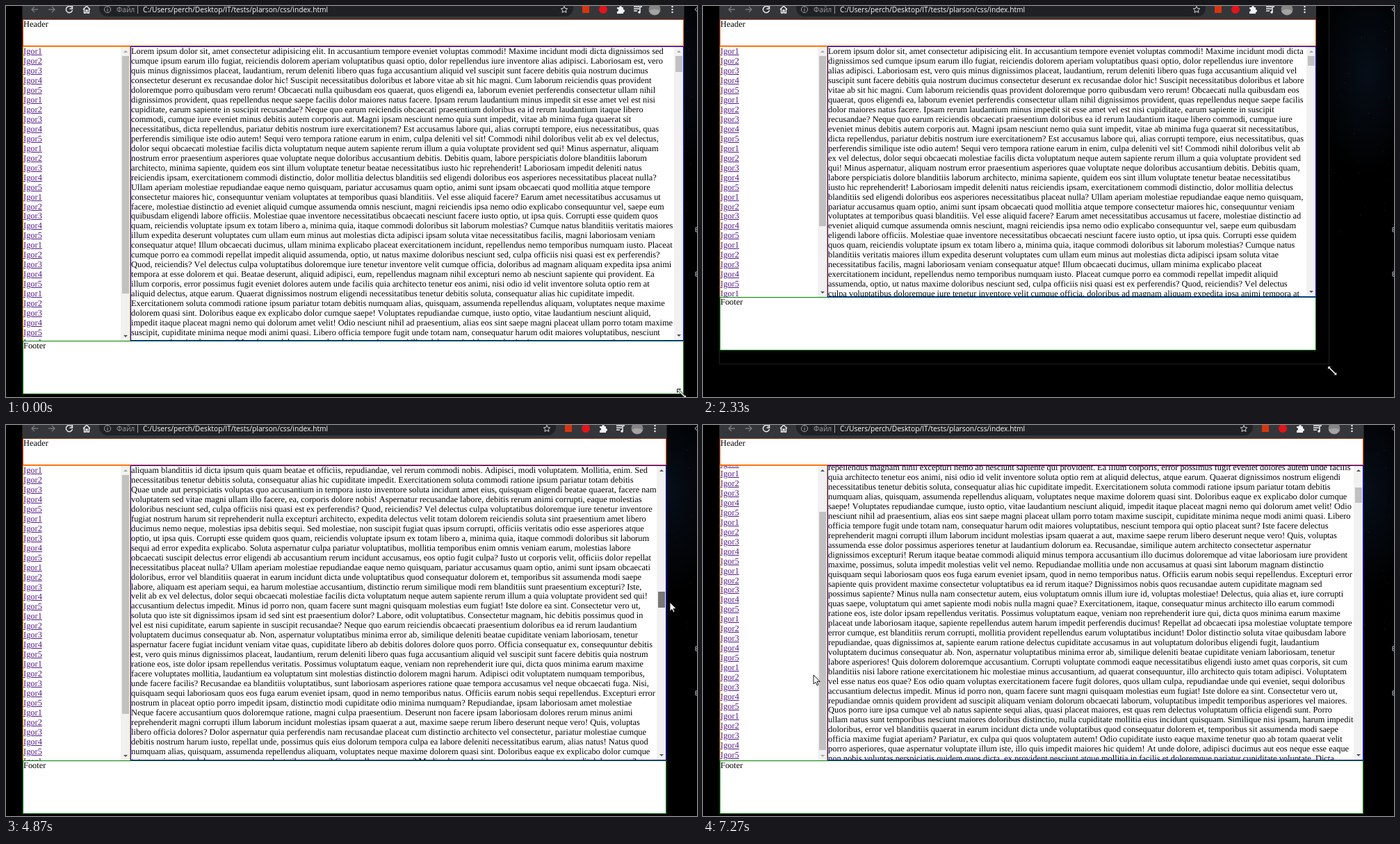
An HTML page that plays this animation: 994x563 px, repeating every 7940 ms.

```html
<!DOCTYPE html>
<html lang="ru">
<head>
<meta charset="utf-8">
<title>Layout resize</title>
<style>
html, body { margin: 0; width: 100%; height: 100%; overflow: hidden; background: #000; }
#stage { position: absolute; width: 994px; height: 563px; overflow: hidden; }
#stage > *, #page > *, .bar, .bar *, #win > * { position: absolute; box-sizing: border-box; }
svg { left: 0; top: 0; overflow: visible; }
#ghost { left: 23px; top: -2px; background: #000; border: 1px solid #1f1f1f; }
#win { left: 24px; top: 0; overflow: hidden; background: #fff; }
#tools { left: -24px; }
#page { font: 12.4px/13.966px "Liberation Serif", "Times New Roman", serif; text-rendering: geometricPrecision; font-kerning: none; font-variant-ligatures: none; }
#page > * { overflow: hidden; background: #fff; }
header { left: 0; right: 0; top: 19px; height: 39px; border: 1px solid orangered; }
aside { left: 0; width: 155px; top: 58px; bottom: 76px; border: 1px solid orange; }
main { left: 155px; right: 0; top: 58px; bottom: 77px; border: 1px solid blue; }
footer { left: 0; right: 0; bottom: 0; height: 77px; border: 1px solid green; }
#text { margin-right: 13px; }
#list span { display: block; color: #551a8b; text-decoration: underline; }
.bar { right: 0; top: 0; bottom: 0; width: 13px; background: #f1f1f1; }
.bar b { left: 2px; width: 10px; }
.bar i { left: 4px; border: 3px solid transparent; }
.bar .up { top: 2px; border-bottom-color: currentColor; }
.bar .down { bottom: 2px; border-top-color: currentColor; }
</style>
</head>
<body>
<div id="stage">
  <svg id="sky" width="994" height="563">
    <radialGradient id="haze"><stop stop-color="#070e18"/><stop offset="1"/></radialGradient>
    <ellipse cx="955" cy="95" rx="75" ry="150" fill="url(#haze)"/>
    <path d="M994 2l-3 3 3 3M994 319h-2v6h2M992 322h2M994 383h-2v6h2M992 386h2" fill="none" stroke="#a9bccb"/>
  </svg>
  <div id="ghost"></div>
  <div id="win">
    <div id="page">
      <header>Header</header>
      <aside><div id="list"></div><div class="bar"><i class="up"></i><b></b><i class="down"></i></div></aside>
      <main><div id="text"></div><div class="bar"><i class="up"></i><b></b><i class="down"></i></div></main>
      <footer>Footer</footer>
    </div>
    <svg id="tools" width="994" height="20" font-family="Open Sans, sans-serif" font-size="10.25">
      <path d="M24-1h980v20.5H24z" fill="#35363a"/>
      <rect id="pill" x="134" y="-10" height="25" rx="12" fill="#202124"/>
      <g fill="none" stroke="#f1f3f4" stroke-width="1.4">
        <path d="M46 5H37M41 1l-4 4 4 4M61 5h9M66 1l4 4-4 4" stroke="#77787b"/>
        <path d="M94.5 2A4.6 4.6 0 1 0 95.5 6M95.5 0v4h-4M111 5l5-5 5 5M112.5 4v6h2.5V6h2v4h2.5V4"/>
        <g stroke="#9aa0a6" stroke-width="1"><circle cx="146" cy="5" r="4.6"/><path d="M146 4v4M146 2v1M189.5 0v11"/></g>
      </g>
      <text x="159" y="9" fill="#9aa0a6">Файл</text>
      <text x="197" y="9" fill="#fff">C:/Users/perch/Desktop/IT/tests/plarson/css/index.html</text>
      <g id="icons" fill="#f1f3f4">
        <path d="M803 .5l1.4 3 3.3.4-2.4 2.2.7 3.3-3-1.7-3 1.7.7-3.3-2.4-2.2 3.3-.4z" fill="none" stroke="#dadce0"/>
        <path d="M829 0h10v10h-10z" fill="#d8350f"/>
        <circle cx="859" cy="5" r="6" fill="#e3141b"/>
        <path d="M879 2h3a2 2 0 1 1 4 0h2v3a2 2 0 1 1 0 4v2h-9V8a2 2 0 0 0 0-4z"/>
        <path d="M903 1h8M903 4h8M903 7h5M912 9V1h3" fill="none" stroke="#f1f3f4" stroke-width="1.5"/>
        <circle cx="911" cy="9" r="1.8"/>
        <circle cx="933" cy="5" r="8.5" fill="#858585"/><path d="M925 7q8-5 16 0a8.5 8.5 0 0 1-16 0" fill="#a5a3a3"/>
        <circle cx="958.5" cy="1" r="1.2"/><circle cx="958.5" cy="5" r="1.2"/><circle cx="958.5" cy="9" r="1.2"/>
      </g>
    </svg>
  </div>
  <svg width="994" height="563" fill="#fff" stroke="#000" stroke-width=".9">
    <path id="sizer" d="M-6.5-6.5h5L-3.2-4.8 4.8 3.2 6.5 1.5v5h-5L3.2 4.8-4.8-3.2-6.5-1.5z"/>
    <path id="arrow" d="M0 0v13l3-2.8 2 4.6 2-.9-2-4.5h4.2z"/>
  </svg>
</div>
<script>
const LOOP = 7940, STEP = 200 / 3, LINE = 13.966;
const $ = s => document.querySelector(s);

const opening = `Lorem ipsum dolor sit, amet consectetur adipisicing elit. In accusantium tempore eveniet voluptas commodi! Maxime incidunt modi dicta dignissimos
sed cumque ipsum earum illo fugiat, reiciendis dolorem aperiam voluptatibus quasi optio, dolor repellendus iure inventore alias adipisci. Laboriosam
est, vero quis minus dignissimos placeat, laudantium, rerum deleniti libero quas fuga accusantium aliquid vel suscipit sunt facere debitis quia nostrum
ducimus consectetur deserunt ex recusandae dolor hic! Suscipit necessitatibus doloribus et labore vitae ab sit hic magni. Cum laborum reiciendis quas
provident doloremque porro quibusdam vero rerum! Obcaecati nulla quibusdam eos quaerat, quos eligendi ea, laborum eveniet perferendis consectetur
ullam nihil dignissimos provident, quas repellendus neque saepe facilis dolor maiores natus facere. Ipsam rerum laudantium minus impedit sit esse amet
vel est nisi cupiditate, earum sapiente in suscipit recusandae? Neque quo earum reiciendis obcaecati praesentium doloribus ea id rerum laudantium
itaque libero commodi, cumque iure eveniet minus debitis autem corporis aut. Magni ipsam nesciunt nemo quia sunt impedit, vitae ab minima fuga
quaerat sit necessitatibus, dicta repellendus, pariatur debitis nostrum iure exercitationem? Est accusamus labore qui, alias corrupti tempore, eius
necessitatibus, quas perferendis similique iste odio autem! Sequi vero tempora ratione earum in enim, culpa deleniti vel sit! Commodi nihil doloribus
velit ab ex vel delectus, dolor sequi obcaecati molestiae facilis dicta voluptatum neque autem sapiente rerum illum a quia voluptate provident sed qui!
Minus aspernatur, aliquam nostrum error praesentium asperiores quae voluptate neque doloribus accusantium debitis. Debitis quam, labore perspiciatis
dolore blanditiis laborum architecto, minima sapiente, quidem eos sint illum voluptate tenetur beatae necessitatibus iusto hic reprehenderit! Laboriosam
impedit deleniti natus reiciendis ipsam, exercitationem commodi distinctio, dolor mollitia delectus blanditiis sed eligendi doloribus eos asperiores
necessitatibus placeat nulla? Ullam aperiam molestiae repudiandae eaque nemo quisquam, pariatur accusamus quam optio, animi sunt ipsam obcaecati
quod mollitia atque tempore consectetur maiores hic, consequuntur veniam voluptates at temporibus quasi blanditiis. Vel esse aliquid facere? Earum
amet necessitatibus accusamus ut facere, molestiae distinctio ad eveniet aliquid cumque assumenda omnis nesciunt, magni reiciendis ipsa nemo odio
explicabo consequuntur vel, saepe eum quibusdam eligendi labore officiis. Molestiae quae inventore necessitatibus obcaecati nesciunt facere iusto
optio, ut ipsa quis. Corrupti esse quidem quos quam, reiciendis voluptate ipsum ex totam libero a, minima quia, itaque commodi doloribus sit laborum
molestias? Cumque natus blanditiis veritatis maiores illum expedita deserunt voluptates cum ullam eum minus aut molestias dicta adipisci ipsam soluta
vitae necessitatibus facilis, magni laboriosam veniam consequatur atque! Illum obcaecati ducimus, ullam minima explicabo placeat exercitationem
incidunt, repellendus nemo temporibus numquam iusto. Placeat cumque porro ea commodi repellat impedit aliquid assumenda, optio, ut natus maxime
doloribus nesciunt sed, culpa officiis nisi quasi est ex perferendis? Quod, reiciendis? Vel delectus culpa voluptatibus doloremque iure tenetur inventore
velit cumque officia, doloribus ad magnam aliquam expedita ipsa animi tempora at esse dolorem et qui. Beatae deserunt, aliquid adipisci, eum,
repellendus magnam nihil excepturi nemo ab nesciunt sapiente qui provident. Ea illum corporis, error possimus fugit eveniet dolores autem unde facilis
quia architecto tenetur eos animi, nisi odio id velit inventore soluta optio rem at aliquid delectus, atque earum. Quaerat dignissimos nostrum eligendi
necessitatibus tenetur debitis soluta, consequatur alias hic cupiditate impedit. Exercitationem soluta commodi ratione ipsum pariatur totam debitis
numquam alias, quisquam, assumenda repellendus aliquam, voluptates neque maxime dolorem quasi sint. Doloribus eaque ex explicabo dolor cumque
saepe! Voluptates repudiandae cumque, iusto optio, vitae laudantium nesciunt aliquid, impedit itaque placeat magni nemo qui dolorum amet velit! Odio
nesciunt nihil ad praesentium, alias eos sint saepe magni placeat ullam porro totam maxime suscipit, cupiditate minima neque modi animi quasi. Libero
officia tempore fugit unde totam nam, consequatur harum odit maiores voluptatibus, nesciunt tempora qui optio placeat sunt? Iste facere delectus
reprehenderit magni corrupti illum laborum incidunt molestias ipsam quaerat a aut, maxime saepe rerum libero deserunt neque vero! Quis, voluptas
assumenda esse dolor possimus asperiores tenetur at laudantium dolorum ea. Recusandae, similique autem architecto consectetur aspernatur
dignissimos excepturi! Rerum itaque beatae commodi aliquid minus tempora accusantium illo ducimus doloremque ad vitae laboriosam iure provident
maxime, possimus, soluta impedit molestias velit vel nemo. Repudiandae mollitia unde non accusamus at quasi sint laborum magnam distinctio
quisquam sequi laboriosam quos eos fuga earum eveniet ipsam, quod in nemo temporibus natus. Officiis earum nobis sequi repellendus. Excepturi error
sapiente quis provident maxime consectetur voluptatibus ea id rerum itaque? Dignissimos nobis quos recusandae autem cupiditate magnam sed
possimus sapiente? Minus nulla nam consectetur autem, eius voluptatum omnis illum iure id, voluptas molestiae! Delectus, quia alias et, iure corrupti
quas saepe, voluptatum qui amet sapiente modi nobis nulla magni quae? Exercitationem, itaque, consequatur minus architecto illo earum commodi
ratione eos, iste dolor ipsam repellendus veritatis. Possimus voluptatum eaque, veniam non reprehenderit iure qui, dicta quos minima earum maxime
placeat unde laboriosam itaque, sapiente repellendus autem harum impedit perferendis ducimus! Repellat ad obcaecati ipsa molestiae voluptate tempore
error cumque, est blanditiis rerum corrupti, mollitia provident repellendus earum voluptatibus incidunt! Dolor distinctio soluta vitae quibusdam labore
repudiandae, quas dignissimos at, sapiente earum ratione delectus cupiditate accusamus in aut voluptatum doloribus eligendi fugit, laudantium
voluptatem ducimus consequatur ab. Non, aspernatur voluptatibus minima error ab, similique deleniti beatae cupiditate veniam laboriosam, tenetur
labore asperiores! Quis dolorem doloremque accusantium. Corrupti voluptate commodi eaque necessitatibus eligendi iusto amet quas corporis, sit cum
blanditiis nisi labore ratione exercitationem hic molestiae minus accusantium, ad quaerat consequuntur, illo architecto quis totam adipisci. Voluptatem
vel esse natus eos quae? Eos odio quam voluptas exercitationem facere fugit dolores, quos ullam culpa, repudiandae unde qui eveniet, sequi doloribus
accusantium delectus impedit. Minus id porro non, quam facere sunt magni quisquam molestias eum fugiat! Iste dolore ea sint. Consectetur vero ut,
repudiandae omnis quidem provident ad suscipit aliquam veniam dolorum obcaecati laborum, voluptatibus impedit temporibus asperiores vel maiores.
Quos porro iure ipsa cumque vel ab natus sapiente sequi alias, quasi placeat maiores, est quas rem delectus voluptatum officia eligendi sunt. Porro
ullam natus sunt temporibus nesciunt maiores doloribus distinctio, nulla cupiditate mollitia eius incidunt quisquam. Similique nisi ipsam, harum impedit
doloribus, error vel blanditiis quaerat in earum incidunt dicta unde voluptatibus quod consequatur dolorem et, temporibus sit assumenda modi saepe
officia maxime fugiat aperiam? Pariatur, ex culpa qui quos voluptatem autem! Odio cupiditate iusto eaque maxime tenetur quo ab totam quaerat velit
porro asperiores, quae aspernatur voluptate illum iste, illo quis impedit maiores hic quidem! At unde dolore, adipisci ducimus aut eos neque esse eaque
non nobis voluptas perspiciatis quidem quos dicta, ex provident nesciunt atque mollitia in facilis et doloremque pariatur cupiditate voluptate. Dicta`.split("\n");

const middle = `sequi ad error expedita explicabo. Soluta aspernatur culpa pariatur voluptatibus, mollitia temporibus enim omnis veniam earum, molestias labore
nesciunt nobis aliquid eaque, aut id minus tempora officia? Quaerat deserunt nulla ad autem debitis delectus nemo, exercitationem provident, nesciunt
at consectetur ex repellendus non distinctio dignissimos laboriosam voluptatem facere officia tempore reprehenderit. Veniam ipsam voluptatibus
veritatis neque dolor voluptas, vero ab aut modi. Quia ut odio dolore molestias rerum, quas perspiciatis eum adipisci consectetur assumenda! Odit,
fugiat nostrum harum sit reprehenderit nulla excepturi architecto, expedita delectus velit totam dolorem reiciendis soluta sint praesentium amet libero
ducimus quaerat! Sunt est velit ab itaque at ut recusandae quas dolorem pariatur blanditiis voluptas voluptatum cum eius saepe vitae ipsa natus, vero
corrupti quasi placeat voluptates nobis. Temporibus, cupiditate non et dicta minus accusantium reprehenderit? Ipsum in facere, officiis vel neque culpa
nihil perferendis omnis eligendi delectus repellat dolor excepturi eum nesciunt quo temporibus consectetur unde soluta blanditiis libero voluptatibus et.
Quae unde aut perspiciatis voluptas quo accusantium in tempora iusto inventore soluta incidunt amet eius, quisquam eligendi beatae quaerat, facere nam
totam, enim natus dolor consequuntur voluptatibus neque? Cum, nulla accusamus? Modi culpa molestias quam quis quidem, impedit doloremque?
Maxime similique sunt necessitatibus amet sequi iste, quia voluptate praesentium eum iure illo explicabo, assumenda recusandae magni dignissimos
voluptates expedita cumque fugit nulla rerum quas dolore fuga. Nesciunt numquam quibusdam inventore eos laboriosam eum consectetur recusandae
ex ea et omnis maxime quia dolorum, sunt cumque! Iure consequuntur molestiae quisquam, deleniti quae assumenda voluptatum distinctio aliquid odit
libero officia dolores? Dolor aspernatur quia perferendis nam recusandae placeat cum distinctio architecto vel consectetur, pariatur molestiae cumque
obcaecati eius eos! Aspernatur adipisci harum doloribus in? Animi nemo ut labore beatae? Praesentium dolore minus atque eum excepturi esse, quod
quisquam quibusdam enim dolor quam repellat. Iure quibusdam molestias, suscipit similique earum voluptates unde dolores et laboriosam,
consequuntur iusto architecto sed explicabo nemo dolorum eveniet, non eos perferendis aliquid? Cum asperiores et possimus officia harum quas illo
nostrum in placeat optio porro impedit ipsam, distinctio modi cupiditate odio minima numquam? Repudiandae, ipsam laboriosam amet molestiae
quaerat eos minus unde, repellendus molestias architecto saepe, enim provident eaque nemo voluptas optio ea iusto. Est nulla aperiam quidem non velit,
et aliquam repudiandae soluta porro possimus ratione facere! Neque esse iure aliquam qui voluptates non alias suscipit! Quod impedit odio velit id,
adipisci necessitatibus vero nesciunt itaque quae. Porro, dolorum officiis quia ipsum fuga in ullam doloribus est perferendis ex optio esse laborum
facere voluptates mollitia, laudantium ea voluptatum sint molestias distinctio dolorem magni harum. Adipisci odit voluptatem numquam temporibus,
amet, nobis reiciendis sit ex accusantium sint omnis cupiditate vitae ullam ratione voluptate officia voluptas expedita dolor dignissimos. Repellat,
reiciendis asperiores. Accusantium consequuntur nulla esse molestias dolor temporibus, odit, minima repellendus placeat veniam mollitia rerum
architecto magni nobis impedit iste praesentium nam autem! Et voluptatum delectus, amet praesentium nemo cum impedit similique, voluptas
aspernatur facere fugiat incidunt veniam vitae quas, cupiditate libero ab debitis dolores dolore quos porro. Officia consequatur ex, consequuntur debitis
dolor velit aut dolore! Eius dolorem blanditiis temporibus veniam beatae, amet nostrum repellendus explicabo obcaecati accusamus repudiandae
architecto laboriosam quaerat harum culpa voluptatem voluptas quam atque esse eos ea, maiores quo eaque. Veritatis necessitatibus aut consequatur
veniam non eligendi nihil dolores, ipsum totam! In non, voluptatibus voluptates reprehenderit quisquam velit unde fuga perferendis sapiente tempora
soluta quo iste sit dignissimos ipsam id sed sint est praesentium dolor? Labore, odit voluptatibus. Consectetur magnam, hic debitis possimus quod in`.split("\n");

const late = `nam cupiditate quia. Expedita reiciendis mollitia, praesentium dolor maxime itaque quam, labore fuga quae ut optio voluptatum perspiciatis error?
Harum sunt odio atque incidunt totam accusamus in facilis placeat voluptates! Maxime iste ducimus laudantium, nam aspernatur, voluptas nihil minus
sit asperiores at, soluta rem repudiandae? Ea, ducimus beatae veniam voluptatem exercitationem saepe! Eum nostrum eius iste provident sit expedita
labore, aliquam est aperiam sequi, ea harum molestiae accusantium, distinctio rerum similique modi rem blanditiis sunt praesentium excepturi? Iste,
labore, aliquid sequi exercitationem ea sed consequuntur temporibus sit laborum aperiam quia rem voluptates animi fuga deserunt cum voluptas
quisquam dolores quidem ipsa ex. Minima enim mollitia laboriosam, voluptate natus necessitatibus, vel autem neque quos perferendis corrupti
voluptates, adipisci ad laudantium in fuga possimus alias dolorum delectus magni temporibus quibusdam culpa amet praesentium! Veniam iusto atque
obcaecati suscipit delectus error eligendi ab accusantium rerum incidunt accusamus, eos optio fugit culpa? Iusto ut corporis velit, officiis dolor repellat
asperiores pariatur eum consectetur animi voluptatum assumenda vel culpa quia ullam dolorum rem? Impedit laudantium, dignissimos assumenda hic
amet consequuntur modi, id officiis sed alias autem nam nobis. Laudantium consectetur qui tenetur laboriosam, explicabo mollitia. Et, qui doloremque.
Architecto exercitationem debitis, facere doloremque labore voluptatum. Unde optio dolorum, deserunt enim modi numquam corrupti molestiae
ducimus nemo neque, molestias ipsa debitis sequi. Sed molestiae, non suscipit fugiat quas ipsum corrupti, officiis veritatis odio esse asperiores atque
nesciunt? Ea ut temporibus nemo quo velit veritatis ullam ducimus ipsum natus aut molestias, dolorem consequuntur aspernatur, labore quas in? Animi
provident earum eum ad adipisci nulla repellat, deleniti inventore blanditiis quis magni nisi quos. Expedita quas doloremque illum libero obcaecati
accusantium quisquam doloribus vero odit praesentium delectus officia provident asperiores a ad odio, mollitia, est officiis! Vero beatae aliquid est
voluptatem sed vitae magni ullam illo facere, ea, corporis dolore nobis! Aspernatur recusandae labore, debitis rerum animi corrupti, eaque molestias
ipsam temporibus modi quas? Fugiat consequatur, molestias maxime saepe commodi velit, repellendus rerum omnis deserunt totam ipsa eveniet ipsam
quibusdam recusandae rem, esse ea mollitia doloremque tempore aspernatur asperiores! Minus nisi, consectetur, commodi voluptatibus dolores porro
ducimus consequuntur nulla excepturi omnis nesciunt dolore vero saepe. Totam distinctio nostrum nam reprehenderit assumenda iste voluptates
aliquam blanditiis id dicta ipsum quis quam beatae et officiis, repudiandae, vel rerum commodi nobis. Adipisci, modi voluptatem. Mollitia, enim. Sed
debitis nostrum harum iusto, repellat unde, possimus quis eius dolorum tempora culpa ea labore deleniti necessitatibus earum, alias natus! Natus quod
distinctio recusandae facere eius dolorum illo! Ullam veritatis error atque voluptatem, cum ipsa corporis natus vel doloremque numquam quidem magni
perspiciatis eveniet, ipsum provident, tempora pariatur aliquid ab debitis ducimus reprehenderit non exercitationem distinctio maxime? Quae
consectetur autem officia fuga nihil nemo laborum expedita tempore nisi possimus, ipsa nesciunt rem accusantium quo est et saepe repellendus ex.
Neque facere accusantium quos doloremque ratione, magni culpa praesentium. Deserunt non facere ipsam laboriosam dolores rerum minus animi
veritatis? Delectus nemo nisi quis enim voluptate placeat alias aut, unde quaerat esse quasi maiores rem facilis. Quibusdam praesentium consectetur
labore maxime sapiente aspernatur atque, sunt ipsam numquam repellat, dolor nesciunt ut. Eos enim esse optio, molestiae consectetur praesentium
distinctio. Maiores et qui modi, reiciendis maxime animi non quidem autem voluptatibus dicta obcaecati rerum eius quaerat cum ab fugit assumenda
unde facere facilis? Recusandae ea blanditiis voluptatibus, sunt laboriosam asperiores ratione quae tempora accusamus vel neque obcaecati fuga. Nisi,
consequatur officia eius quia dolor exercitationem labore doloremque natus porro? Totam aspernatur est quibusdam numquam, eaque unde nisi fugit`.split("\n");

const pool = [...opening, ...middle, ...late];
const filler = n => Array.from({ length: n }, (_, i) => pool[(i * 37 + n) % pool.length]);
$("#text").textContent = [...opening, ...filler(10), ...middle, ...filler(41), ...late, ...filler(110)].join("\n");
$("#list").innerHTML = Array.from({ length: 35 }, (_, i) => `<span>Igor${i % 5 + 1}</span>`).join("");

let seed = 7;
const rnd = () => (seed = seed * 16807 % 2147483647) / 2147483647;
for (let i = 0; i < 60; i++)
  $("#sky").innerHTML += `<circle cx="${880 + rnd() * 114}" cy="${rnd() * 330}" r=".6" fill="#6d8aa8" opacity="${rnd() * .3}"/>`;

// Rows are [time, ...values], joined linearly.
const corner = [[560, 975, 559], [940, 937, 517], [1010, 933, 513], [1070, 924, 509], [1200, 900, 486], [1400, 876, 466],
  [1800, 838, 440], [2000, 850, 455], [2200, 881, 495], [2270, 899, 515], [2330, 908, 526], [2740, 944, 560], [2990, 946, 560], [3140, 949, 560], [3240, 950, 560]];
const pointer = [[3470, 948, 560], [3530, 930, 400], [3600, 915, 220], [3660, 907, 146], [3800, 907, 146], [3940, 942, 86], [4000, 944, 86],
  [4400, 951, 134], [4600, 954, 190], [4870, 955, 256], [5000, 950, 238], [5200, 941, 156], [5330, 941, 104], [5600, 941, 104],
  [5665, 560, 150], [5730, 131, 200], [5800, 172, 226], [6070, 172, 226], [6470, 176, 290], [6600, 176, 330], [6870, 170, 236], [7130, 170, 320], [7260, 159, 360]];
const textScroll = [[4000, 0], [4130, 150], [4400, 905.6], [4600, 1960], [4870, 3200], [5000, 2960], [5200, 1896.4], [5270, 1280], [5400, 339]];
const listScroll = [[6070, 0], [6270, 30], [6470, 65], [6600, 65], [6870, 10], [7000, 22], [7130, 65]];

function at(keys, t) {
  const i = keys.findIndex(k => k[0] > t);
  if (i < 1) return keys.at(i).slice(1);
  const a = keys[i - 1], b = keys[i], f = (t - a[0]) / (b[0] - a[0]);
  return a.slice(1).map((v, j) => v + (b[j + 1] - v) * f);
}

function size(el, w, h) {
  el.style.width = w + "px";
  el.style.height = h + "px";
}

function setBar(box, view, total, scroll, color) {
  const track = view - 26, thumb = $(box + " b").style;
  thumb.top = 13 + scroll / total * track + "px";
  thumb.height = view / total * track + "px";
  thumb.background = color;
  $(box + " .up").style.color = scroll > 0 ? "#505050" : "#a3a3a3";
  $(box + " .down").style.color = scroll >= total - view - 2 ? "#a3a3a3" : "#505050";
}

function place(el, x, y, shown) {
  el.setAttribute("transform", `translate(${x} ${y})`);
  el.style.display = shown ? "" : "none";
}

function draw(now) {
  const t = Math.floor((now % LOOP + 4) / STEP) * STEP;
  const tip = at(corner, t), outer = at(corner, t - 60).map(Math.round), [r, b] = at(corner, t - 130).map(Math.round);
  size($("#ghost"), outer[0] - 22, outer[1] + 2);
  size($("#win"), Math.min(outer[0], r) - 24, Math.min(outer[1], b));
  size($("#page"), r - 24, b);
  $("#pill").setAttribute("width", r - 293);
  $("#icons").setAttribute("transform", `translate(${r - 975})`);

  const view = b - 137, [ts] = at(textScroll, t), [ls] = at(listScroll, t);
  $("#text").style.whiteSpace = r > 947 && r < 952 ? "pre" : "normal";
  $("#text").style.transform = `translateY(${-ts}px)`;
  $("#list").style.transform = `translateY(${-ls}px)`;
  const grab = t > 3990 && t < 5500, hover = t > 5500 && t < 5650;
  setBar("main", view, 7495 * 757 / (r - 194), ts, grab ? "#787878" : hover ? "#a8a8a8" : "#c1c1c1");
  setBar("aside", view, 35 * LINE, ls, t > 6100 && t < 7220 ? "#787878" : "#c1c1c1");

  place($("#sizer"), tip[0] - 3, tip[1] - 1, t < 3500);
  place($("#arrow"), ...at(pointer, t), t >= 3500);
}

const start = performance.now();
function tick() {
  draw(performance.now() - start);
  requestAnimationFrame(tick);
}
tick();
</script>
</body>
</html>
```
